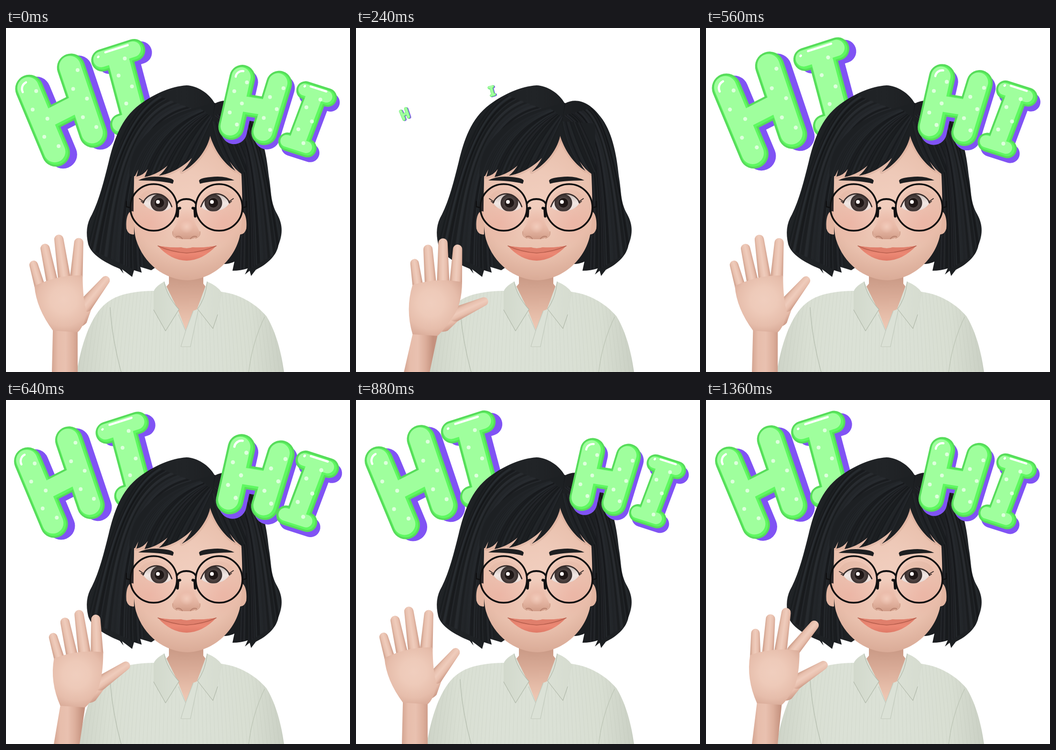
An HTML page with a canvas for the animation above (1440 ms loop, 720x720 px).

```html
<!DOCTYPE html>
<html lang="en">
<head>
<meta charset="utf-8">
<title>Hi hi</title>
<style>
html, body { margin: 0; width: 100%; height: 100%; overflow: hidden; background: #fff; }
canvas { display: block; width: 720px; height: 720px; }
</style>
</head>
<body>
<canvas id="stage" width="720" height="720"></canvas>
<script>
const ctx = document.getElementById('stage').getContext('2d');
const LOOP = 1440, STEP = 80;
const { PI, sin, cos, exp, abs, min, max } = Math;
const clamp = v => min(1, max(0, v));
const mix = (a, b, k) => a + (b - a) * k;
const mixPoint = (p, q, k) => [mix(p[0], q[0], k), mix(p[1], q[1], k)];
const random = seed => { const v = sin(seed * 12.9898) * 43758.5453; return v - Math.floor(v); };
function smooth(from, to, v) {
  const k = clamp((v - from) / (to - from));
  return k * k * (3 - 2 * k);
}
// A point at a distance from p; angle in degrees, clockwise from straight up.
function reach(p, distance, degrees) {
  const a = degrees * PI / 180;
  return [p[0] + distance * sin(a), p[1] - distance * cos(a)];
}

function fill(d, color) { ctx.fillStyle = color; ctx.fill(new Path2D(d)); }
function line(d, color, width) {
  ctx.strokeStyle = color;
  ctx.lineWidth = width;
  ctx.stroke(new Path2D(d));
}
function disc(x, y, r, color) {
  ctx.fillStyle = color;
  ctx.beginPath();
  ctx.arc(x, y, r, 0, 7);
  ctx.fill();
}
function stops(gradient, colors) {
  colors.forEach((c, i) => gradient.addColorStop(i / (colors.length - 1), c));
  return gradient;
}
const linear = (x0, y0, x1, y1, ...colors) => stops(ctx.createLinearGradient(x0, y0, x1, y1), colors);
const radial = (x, y, r, ...colors) => stops(ctx.createRadialGradient(x, y, 0, x, y, r), colors);
const glow = (x, y, r, rgb, alpha) => disc(x, y, r, radial(x, y, r, `rgba(${rgb},${alpha})`, `rgba(${rgb},0)`));
function clipped(d, draw) {
  ctx.save();
  ctx.clip(new Path2D(d));
  draw();
  ctx.restore();
}
function mirrored(draw) {
  draw();
  ctx.save();
  ctx.translate(755, 0);
  ctx.scale(-1, 1);
  draw();
  ctx.restore();
}

// w and h are half sizes; tilt turns the crossbars, lean turns the uprights.
const bigH = { kind: 'H', x: 118, y: 173, w: 46.5, h: 72.6, tilt: -.47, lean: -.36, thick: 59, shadow: [15, 4] };
const bigI = { kind: 'I', x: 253, y: 125, w: 33, h: 70.4, tilt: -.31, lean: -.26, thick: 58, shadow: [14, 5] };
const smallH = { kind: 'H', x: 519.5, y: 161.5, w: 37, h: 53, tilt: .16, lean: .26, thick: 54, shadow: [6, 9] };
const smallI = { kind: 'I', x: 630, y: 191.5, w: 23, h: 57, tilt: .31, lean: .36, thick: 48, shadow: [6, 10] };

function drawLetter(letter, scale, dx, dy) {
  const { kind, x, y, w, h, tilt, lean, thick, shadow } = letter;
  const at = (a, b) => {
    const across = a * w * (1 - .055 * b);
    return [across * cos(tilt) - b * h * sin(lean), across * sin(tilt) + b * h * cos(lean)];
  };
  const bar = (a0, b0, a1, b1, width) => [`M${at(a0, b0)} L${at(a1, b1)}`, thick * width];
  const bars = kind === 'H'
    ? [bar(-1, -1, -1, 1, 1), bar(1, -1, 1, 1, 1), bar(-.9, .05, .9, .05, .86)]
    : [bar(-1, -1, 1, -1, .81), bar(0, -.9, 0, .9, 1), bar(-1, 1, 1, 1, .81)];
  ctx.save();
  ctx.translate(x + dx, y + dy);
  ctx.scale(scale, scale);
  const layers = [[...shadow, '#8053f4', 0], [0, 0, '#57dc5b', 0], [0, 0, '#5ff961', -8], [-2.5, -2, '#9fff9d', -14]];
  for (const [ox, oy, color, grow] of layers) {
    ctx.save();
    ctx.translate(ox, oy);
    for (const [path, width] of bars) line(path, color, width + grow);
    ctx.restore();
  }
  for (const side of kind === 'H' ? [-1, 1] : [0]) {
    for (let i = 0; i < 5; i++) {
      disc(...at(side + (i % 2 ? -10 : 11) / w, -.85 + .43 * i), 4, '#deffdd');
    }
  }
  if (kind === 'H') {
    ctx.beginPath();
    ctx.arc(...at(-1, -1), thick * .26, PI + tilt, 1.5 * PI + tilt);
    ctx.strokeStyle = '#fff';
    ctx.lineWidth = 4.5;
    ctx.stroke();
  } else {
    line(`M${at(-.7, -1.2)} L${at(.7, -1.2)} M${at(-1.2, -1.13)} l1 -1`, '#fff', 4.5);
  }
  ctx.restore();
}

// Letters grow, overshoot and settle; spread pushes a pair apart.
function drawPair(first, second, age, spread) {
  const grow = clamp(age / 165), rest = max(0, age - 165);
  const scale = grow + .1 * sin(rest * .014) * exp(-rest / 270);
  if (scale <= 0) return;
  const apart = spread * (4.5 * (1 - grow) + sin(PI * clamp(rest / 500)));
  const drop = 8 * (1 - grow);
  drawLetter(first, scale, -4 * apart, drop);
  drawLetter(second, scale, 8 * apart, drop);
}
const ageAt = (t, start) => t < STEP ? LOOP : t - start;

const hair = `M378 120 C345 122 310 138 280 160 C240 190 226 235 215 280 C205 320 195 360 180 390
  C168 410 167 430 172 452 C178 474 205 490 238 504 L246 514 L243 505 L264 521 L268 507 L284 512
  L281 500 L304 507 L330 490 L330 400 L440 400 L440 480 L455 494 Q468 494 478 489 L474 508
  Q492 508 506 503 L500 516 L510 508 L513 519 L523 506 C545 495 566 478 570 455
  C580 430 580 410 565 385 C553 360 556 345 550 310 C545 260 535 215 512 186
  C490 156 462 144 437 158 C425 136 400 121 378 120Z`;
const bangs = `M437 158 L428 222 C424 250 400 285 368 301 Q382 287 389 272 C370 291 345 305 320 309
  Q332 299 338 288 C322 302 305 309 290 312 L297 295 Q288 308 273 311 L277 296 L270 310 L258 311
  C258 240 310 180 437 158Z`;
const sideBangs = `M430 195 L427 225 C436 255 455 283 480 299 Q473 290 468 279 Q480 297 494 306
  L502 300 L500 200Z`;
const face = `M268 310 C262 250 340 212 427 215 C480 230 492 270 493 310 C495 360 496 400 490 433
  C479 487 430 527 380 528 C332 527 288 494 272 442 C264 410 268 350 268 310Z`;

function strands(shape, count, path) {
  clipped(shape, () => {
    for (let i = 0; i < count; i++) {
      const tone = random(i + 3) < .5 ? '58,63,70' : '8,9,11';
      line(path(i / (count - 1)), `rgba(${tone},${.08 + .2 * random(i)})`, 1.5 + 3 * random(i + 50));
    }
  });
}

function drawHair() {
  fill(hair, linear(170, 0, 576, 0, '#202326', '#1d2023', '#212427', '#1b1d20', '#1f2225'));
  strands(hair, 45, s => `M${430 - 120 * s} ${185 - 45 * s} C${300 - 50 * s} ${200 - 20 * s}
    ${270 - 60 * s} 300 ${290 - 118 * s} ${515 - 55 * s}`);
  strands(hair, 40, s => `M${436 + 60 * s} ${184 - 16 * s} C${500 + 30 * s} ${225 - 25 * s}
    ${495 + 62 * s} 340 ${488 + 88 * s} ${515 - 50 * s}`);
  line('M437 158 Q431 185 428 222', '#131518', 2.5);
}

function drawBangs() {
  fill(bangs, '#1d2023');
  strands(bangs, 26, s => `M${432 - 25 * s} ${188 - 18 * s} Q${408 - 115 * s} ${245 - 45 * s} ${375 - 112 * s} 314`);
  fill(sideBangs, '#1d2023');
  strands(sideBangs, 14, s => `M${430 + 36 * s} 192 Q${440 + 60 * s} 258 ${476 + 36 * s} 304`);
}

function drawBody(sleeve) {
  fill('M341 500 L341 535 L320 560 L376 640 L432 560 L413 535 L413 500Z',
    linear(0, 505, 0, 620, '#c4937f', '#d9ab97', '#ecc5b1'));
  const shirt = `M331 531 C320 539 312 544 310 550 C270 551 238 556 215 572
    C182 594 ${sleeve + 12} 650 ${sleeve} 720 L582 720 C575 670 562 630 545 603
    C520 574 485 556 450 552 Q439 538 421 531 L400 588 L376 632 L360 590Z`;
  fill(shirt, linear(140, 0, 586, 0, '#ccd2c6', '#d9dfd3', '#dbe1d6', '#dbe1d6', '#dae0d5', '#d8ded2', '#c9cfc3'));
  clipped(shirt, () => {
    for (let x = 152; x < 590; x += 8.4) {
      line(`M${x} 720 Q${mix(x, 375, .05)} 630 ${mix(x, 375, .13)} 545`, 'rgba(160,171,153,.13)', 1.2);
    }
    line('M218 585 Q222 650 241 720', '#b9c1b3', 1.5);
    line('M541 605 Q515 660 508 720', '#bfc7b8', 1.5);
  });
  fill('M361 597 L376 632 L392 592 L402 588 L386 667 L366 667Z', '#dbe1d6');
  line('M361 600 L376 634 L392 592 M376 634 L366 667 L386 667 L402 592', '#c3cabd', 1.2);
  const collar = `M331 531 Q312 541 309 552 L309 590 L334 634 L362 589 Q337 562 331 531
    M421 531 Q443 540 452 554 L443 600 L433 629 L401 588 Q418 564 421 531`;
  fill(collar, linear(305, 0, 450, 0, '#d1d8cb', '#dce2d7', '#d6dcd0'));
  line('M309 590 L334 634 L362 589 Q337 562 331 531 M443 600 L433 629 L401 588 Q418 564 421 531', '#b1b9aa', 1.2);
}

function drawEyes(blink) {
  const lid = mix(341, 381, blink), outer = mix(366, 371, blink);
  const edge = `M287 ${outer} C297 ${lid} 334 ${lid - 3} 347 374`;
  const eye = `${edge} C336 388 300 388 287 ${outer}Z`;
  mirrored(() => {
    fill('M279 356 C288 330 337 330 349 364 Q337 378 290 376Z', `rgba(180,125,102,${.08 + .13 * blink})`);
    if (blink < .95) {
      fill(eye, linear(0, 346, 0, 386, '#bdb7b3', '#f1edea', '#e4deda'));
      clipped(eye, () => {
        disc(321, 366, 18.5, radial(321, 366, 19, '#4a4645', '#474342', '#262323'));
        disc(321, 366, 10, '#0d0c0c');
      });
    }
    line(edge, '#292423', 2.6);
    line(`M289 ${outer - 2} L279 ${mix(357, 369, blink)} M288 ${outer} L283 ${mix(363, 373, blink)}`, '#292423', 1.8);
    ctx.save();
    ctx.translate(3 * blink, 6 * blink);
    fill('M277 319 Q298 308 327 312 Q350 314 351 320 L349 326 Q325 319 277 319Z', '#1d1e20');
    ctx.restore();
  });
  if (blink < .5) for (const x of [318, 431]) disc(x, 364, 4, '#fff');
}

function drawFace(blink) {
  mirrored(() => fill('M268 385 C256 378 250 398 252 420 Q256 434 268 432Z', '#e3b5a1'));
  fill(face, radial(379, 360, 178, '#f1cebe', '#eec9b8', '#e9c0ad', '#d7a793'));
  clipped(face, () => {
    line(bangs, 'rgba(175,120,98,.16)', 9);
    line(sideBangs, 'rgba(175,120,98,.14)', 8);
    mirrored(() => glow(302, 408, 50, '235,140,128', .16));
    glow(378, 408, 32, '222,138,120', .24);
  });
  fill('M348 428 C352 415 362 410 368 378 L388 378 C392 410 403 417 406 430 Q400 443 377 442 Q354 443 348 428Z',
    linear(0, 380, 0, 444, 'rgba(237,192,174,0)', 'rgba(232,182,163,.5)', '#cd9782'));
  glow(378, 416, 14, '250,220,206', .55);
  mirrored(() => line('M349 426 Q347 436 358 440', '#cf9c87', 1.5));
  line('M356 437 Q364 434 369 441 M386 441 Q392 434 399 437', '#b98370', 2);
  drawEyes(blink);

  const upperLip = 'M318 456 Q350 461 366 459 Q378 463 391 459 Q407 461 440 456 ';
  fill(upperLip + 'Q412 486 378 487 Q344 486 318 456Z', linear(0, 458, 0, 487, '#dd7c68', '#ec8874', '#df7a67'));
  fill(upperLip + 'Q414 469 378 471 Q342 469 318 456Z', '#e07f6c');
  line('M318 456 Q346 469 378 471 Q412 469 440 456', '#b65e4d', 1.4);
}

function drawGlasses() {
  mirrored(() => {
    disc(309, 375.5, 49, linear(0, 326, 0, 425, 'rgba(240,150,140,.04)', 'rgba(238,145,135,.13)'));
    ctx.beginPath();
    ctx.arc(309, 375.5, 48.8, 0, 7);
    ctx.strokeStyle = '#101011';
    ctx.lineWidth = 3.6;
    ctx.stroke();
    line('M252 363 L252 374 L259 376', '#101011', 2.6);
    line('M364 377 L360 378 L359 394', '#101011', 5.5);
  });
  line('M358 367 C365 355 390 355 397 367', '#101011', 4);
}

// Two even waves, then a slower one that eases out.
function wavePhase(t) {
  return t < 880 ? t % 440 / 440 : 1 - (1 - (t - 880) / 560) ** 1.4;
}

function handAt(t) {
  const phase = wavePhase(t);
  const rise = smooth(.25, .58, phase), fall = 1 - smooth(.89, .985, phase);
  const travel = rise * fall;
  const turn = 54 * smooth(.45, .85, phase) * fall ** 2;
  const knuckles = [109 + 62 * travel, 529 + 8 * travel - .25 * turn];
  const slope = 90 - 16 + 10 * travel + .25 * turn;
  const wrist = [124 + 23 * travel - .25 * turn, 635 + 10 * travel - .25 * turn];
  return {
    turn: turn - 11,
    spread: 15 - 9 * rise + 28 * smooth(.55, .9, phase),
    thumb: 39 + 25 * travel + .35 * turn,
    little: reach(knuckles, -40, slope),
    index: reach(knuckles, 40, slope),
    wristL: reach(wrist, -26, 94),
    wristR: reach(wrist, 26, 94),
    arm: 123 + 6 * travel - .2 * turn
  };
}

function finger(base, tip, baseR, tipR) {
  const a = Math.atan2(tip[1] - base[1], tip[0] - base[0]), q = PI / 2;
  const nx = -sin(a) * baseR, ny = cos(a) * baseR;
  ctx.beginPath();
  ctx.arc(...tip, tipR, a - q, a + q);
  ctx.arc(...base, baseR, a + q, a + 3 * q);
  ctx.closePath();
  ctx.fillStyle = linear(base[0] - nx, base[1] - ny, base[0] + nx, base[1] + ny,
    '#cb9b87', '#e8c0ae', '#efccbc', '#e8bfad', '#cc9a87');
  ctx.fill();
}

function drawHand({ turn, spread, thumb, little, index, wristL, wristR, arm }) {
  fill(`M${wristL} L${arm - 27} 720 L${arm + 27} 720 L${wristR} l0 -16 L${wristL[0]} ${wristL[1] - 16}Z`,
    linear(arm - 30, 0, arm + 34, 0, '#cf9f8c', '#e7bdab', '#e9c1b0', '#dcae9b', '#c4917e'));
  [46, 69, 80, 69].forEach((size, i) => {
    const base = mixPoint(little, index, i / 3);
    base[1] -= 4.5 * sin(PI * i / 3);
    const angle = turn + (i < 3 ? 4 * i - 5 : spread);
    finger(base, reach(base, size, angle), min(13, 11 + i), i ? 9.7 : 9);
  });
  const root = mixPoint(index, wristR, .7), tip = reach(root, 94, thumb), joint = mixPoint(root, tip, .3);
  finger(root, joint, 25, 15);
  finger(joint, tip, 15, 9);
  const side = mixPoint(little, wristL, .5), middle = mixPoint(little, index, .5);
  const cx = (side[0] + root[0]) / 2, cy = (middle[1] + wristL[1]) / 2;
  fill(`M${little[0] - 11} ${little[1]} Q${middle[0]} ${middle[1] - 13} ${index[0] + 13} ${index[1]}
    Q${index[0] + 13} ${mix(index[1], root[1], .6)} ${root[0] + 20} ${root[1] - 5}
    Q${wristR[0] + 12} ${wristR[1] - 10} ${wristR} L${wristL}
    Q${side[0] - 21} ${side[1]} ${little[0] - 11} ${little[1]}Z`,
    radial(cx + 4, cy - 12, 82, '#f0cebe', '#eecab9', '#e6bdab', '#d2a18e'));
}

function draw(t) {
  ctx.lineCap = ctx.lineJoin = 'round';
  ctx.fillStyle = '#fff';
  ctx.fillRect(0, 0, 720, 720);
  const hand = handAt(t), blink = clamp(1.5 - abs(t - 1160) / 150);
  drawPair(bigH, bigI, ageAt(t, 220), 1);
  drawHair();
  drawBody(hand.arm + 25);
  drawFace(blink);
  drawBangs();
  drawGlasses();
  drawPair(smallH, smallI, ageAt(t, 380), 0);
  drawHand(hand);
}

let shown = -1;
function tick() {
  const t = Math.floor(performance.now() % LOOP / STEP) * STEP;
  if (t !== shown) draw(shown = t);
  requestAnimationFrame(tick);
}
tick();
</script>
</body>
</html>
```
